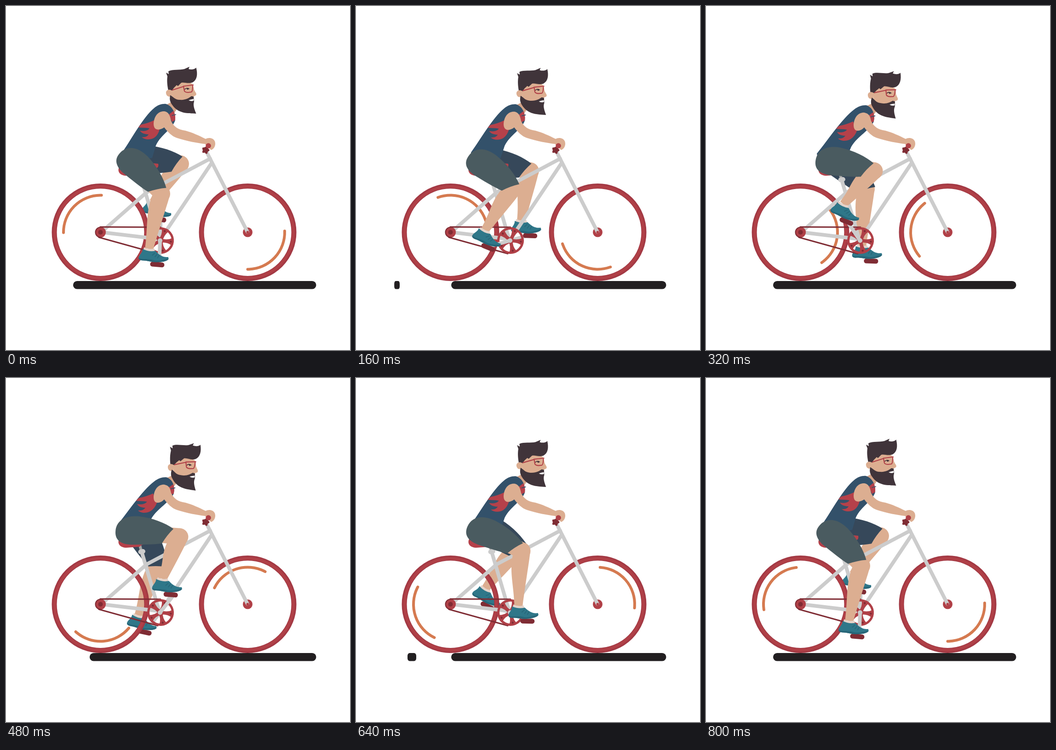
Write an HTML page with a canvas that moves like this. It is 748 px wide and 748 px high and loops after 0.84 s.

```html
<!DOCTYPE html>
<html lang="en">
<head>
<meta charset="utf-8">
<title>Cyclist</title>
<style>
html, body { margin: 0; width: 100%; height: 100%; overflow: hidden; background: #fff; }
canvas { display: block; }
</style>
</head>
<body>
<canvas id="stage" width="748" height="748"></canvas>
<script>
const ctx = document.getElementById('stage').getContext('2d');
const STEP = 40, STEPS = 21, CYCLE = 20, RAD = Math.PI / 180, TURN = 2 * Math.PI;
const C = {
  red: '#b04047', rim: '#a33944', dark: '#7f2c34', grey: '#cccccc', skin: '#dcae91', neck: '#d3a286',
  shirt: '#33516a', flame: '#b5414a', shorts: '#4a5b60', farShorts: '#36485a',
  shoe: '#2f7789', sole: '#276678', sock: '#e4d3ca', hair: '#40343a', orange: '#d57a50', black: '#221f21'
};
const BB = { x: 335, y: 510 };
const REAR = { x: 205.5, y: 492 }, FRONT = { x: 525.5, y: 492 };
const BREAKS = [-5, 3, 9, 15]; // steps at which the ground bar snaps

// Pedal ellipse, middle of the knee's path and its swing, for each leg
const NEAR = { color: C.shorts, pedal: { x: 331, y: 511, rx: 45, ry: 51 }, knee: { x: 357, y: 377 }, swing: 21, drift: 2 };
const FAR = { color: C.farShorts, pedal: { x: 332, y: 513, rx: 49, ry: 50 }, knee: { x: 357, y: 376 }, swing: 27, drift: 6 };

function fill(color, d) {
  ctx.fillStyle = color;
  ctx.fill(new Path2D(d));
}
function stroke(color, width, d, cap = 'round') {
  ctx.strokeStyle = color;
  ctx.lineWidth = width;
  ctx.lineCap = cap;
  ctx.lineJoin = 'round';
  ctx.stroke(new Path2D(d));
}
function line(color, width, x1, y1, x2, y2) {
  stroke(color, width, `M${x1} ${y1}L${x2} ${y2}`);
}
function disc(color, x, y, r) {
  ctx.fillStyle = color;
  ctx.beginPath();
  ctx.arc(x, y, r, 0, TURN);
  ctx.fill();
}
function arc(color, width, x, y, r, from = 0, to = 360) {
  ctx.strokeStyle = color;
  ctx.lineWidth = width;
  ctx.lineCap = 'round';
  ctx.beginPath();
  ctx.arc(x, y, r, from * RAD, to * RAD);
  ctx.stroke();
}
function pill(color, x, y, w, h, r) {
  ctx.fillStyle = color;
  ctx.beginPath();
  ctx.roundRect(x, y, w, h, r);
  ctx.fill();
}
function placed(x, y, angle, draw) {
  ctx.save();
  ctx.translate(x, y);
  ctx.rotate(angle);
  draw();
  ctx.restore();
}

const crankAngle = step => (92 + 18 * step) * RAD;

// How far the upper body leans: 0 upright, 1 down
function leanAt(step) {
  const u = 1 - Math.abs(step - 10) / 10;
  const a = u ** 2.6, b = (1 - u) ** 2.6;
  return a / (a + b);
}

// The foot follows the pedal and tips toe-down on the way up; the knee swings on a slim ellipse
function poseAt({ pedal, knee, swing, drift }, step) {
  const crank = crankAngle(step);
  const tip = (step - 6) / CYCLE * TURN, lift = (step - 11.3) / CYCLE * TURN;
  const foot = (11 + 12.5 * Math.cos(tip) + 3 * Math.cos(2 * tip)) * RAD;
  const cos = Math.cos(foot), sin = Math.sin(foot);
  return {
    foot,
    ankle: {
      x: pedal.x + pedal.rx * Math.cos(crank) - 21 * cos + 32 * sin,
      y: pedal.y + pedal.ry * Math.sin(crank) - 21 * sin - 32 * cos
    },
    knee: {
      x: knee.x + swing * Math.cos(lift) + drift * Math.sin(lift),
      y: knee.y - 33 * Math.cos(lift) + drift * Math.sin(lift)
    }
  };
}

function ground(step) {
  const snap = BREAKS.findLast(b => b <= step), age = step - snap;
  const left = 213 - 6 * age ** 1.5;
  pill(C.black, left, 598, 674.5 - left, 17.5, 8.7);
  const width = 10 + 0.6 * snap - 7 * (age - 1);
  if (width > 3) pill(C.black, 76 + 2.4 * snap - 20 * (age - 1), 598, width, 17.5, { x: width / 4, y: 6 });
}

function wheel({ x, y }, start) {
  arc(C.rim, 11, x, y, 100.5);
  arc(C.red, 6, x, y, 99.5);
  arc(C.orange, 6, x, y, 80.5, start, start + 92);
}

function leg(build, step, hip) {
  const { knee, ankle, foot } = poseAt(build, step);
  const thigh = Math.atan2(knee.y - hip.y, knee.x - hip.x), reach = Math.hypot(knee.x - hip.x, knee.y - hip.y);
  const shin = Math.atan2(ankle.y - knee.y, ankle.x - knee.x), len = Math.hypot(ankle.x - knee.x, ankle.y - knee.y);

  placed(ankle.x, ankle.y, foot, () => pill(C.dark, 5, 27, 31, 10.5, 5));
  disc(C.skin, knee.x, knee.y, 18.5);
  placed(knee.x, knee.y, shin, () => fill(C.skin,
    `M0 -18C25 -17 60 -13 ${len} -9L${len} 9C${len - 40} 12 50 24 15 20L0 18Z`));
  placed(ankle.x, ankle.y, foot, () => {
    fill(C.sock, 'M-11 -3Q0 2 11 -2L14 6L-13 6Z');
    fill(C.shoe, 'M-14 1C-13 10 -22 15 -21 22Q-20 26 -13 26C-2 25 5 28 18 27C33 26 43 22 44 18L43 14C33 16 25 13 14 3Q0 7 -14 1Z');
    fill(C.sole, 'M-21 21C-12 25 0 20 10 23C22 26 34 20 44 17C44 22 33 26 18 27.5C5 28 -2 25 -13 26Q-21 26 -21 21Z');
    stroke(C.sole, 1.6, 'M8 13L13 8M14 16L18 10M20 18L23 12');
  });
  placed(hip.x, hip.y, thigh, () => {
    fill(C.skin, `M70 -18L${reach} -18.5L${reach} 17L70 17Z`);
    fill(build.color, 'M-26 0C-26 -22 -8 -36 22 -36C52 -35 80 -27 99 -16'
      + 'Q86 -1 77 18C60 22 30 25 10 27C-15 28 -26 18 -26 0Z');
  });
}

function crank(angle) {
  line(C.grey, 8, BB.x, BB.y, BB.x + 49 * Math.cos(angle), BB.y + 49 * Math.sin(angle));
}

function saddle() {
  line('#a5a5a5', 6, 291, 364, 296, 382);
  fill(C.flame, 'M246 350C241 361 249 369 262 369L290 367C303 357 317 354 327 353Q333 350 331 343L300 340L255 340Z');
}

function frame() {
  line(C.grey, 8, 295, 378, 334, 510);
  line(C.grey, 10, 292.5, 378, 298, 377);
  line(C.grey, 8, 208, 492, 334, 507);
  stroke(C.grey, 8, 'M208 491L306 405L444 332');
  line(C.grey, 8, 334, 510, 446, 343);
  disc(C.red, FRONT.x, FRONT.y, 10.5);
  line(C.grey, 8, 437, 319, 525, 491);
  disc(C.red, FRONT.x, FRONT.y, 3);
}

function drivetrain(angle) {
  disc(C.red, REAR.x, REAR.y, 11.5);
  disc(C.dark, REAR.x, REAR.y, 5);
  stroke(C.dark, 3, 'M205 480.5L336 481M202 503L330 538.5');
  arc(C.dark, 2, REAR.x, REAR.y, 11, 90, 270);
  placed(336, 510, angle - 86 * RAD, () => {
    arc(C.red, 5, 0, 0, 26.5);
    for (let i = 0; i < 5; i++) {
      ctx.rotate(TURN / 5);
      fill(C.red, 'M0 -5Q13 -1 25 -8L25 8Q13 1 0 5Z');
      disc(C.dark, 22.5, 0, 2.2);
    }
    disc(C.red, 0, 0, 7);
  });
  disc(C.grey, 335, 510, 5);
}

function torso(lean) {
  ctx.save();
  ctx.transform(1, 0, -0.13 * lean, 1, 29 * lean, 3 * lean);
  fill(C.shirt, 'M253 318C275 286 298 242 322 222C330 215 340 212 348 213C362 218 369 232 368 248C362 268 338 278 326 303L318 330L262 345Z');
  fill(C.flame, 'M293 258Q309 255 323 248L334 268Q331 280 323 286C316 291 302 292 295 285C303 286 308 283 310 279C302 279 295 277 291 271C300 273 309 271 312 266C304 264 296 265 288 264Z');
  fill(C.flame, 'M354 236L364 228Q369 236 368 248L361 252Z');
  stroke(C.shirt, 1.8, 'M361 238L369 236');
  ctx.restore();
}

function arm(lean) {
  const s = 3 * lean;
  fill(C.skin, `M321 ${256 + s}C322 ${238 + s} 332 ${228 + s} 345 ${229 + s}C354 ${231 + s} 357 239 359 250`
    + 'C365 263 375 269 390 271C405 275 420 282 434 289C441 285 451 287 454 294C457 302 453 311 446 313L438 306L433 300'
    + `C415 298 395 294 372 287C360 283 352 274 344 264C336 ${270 + s} 321 ${273 + s} 321 ${256 + s}Z`);
}

function grip() {
  disc(C.dark, 434, 313, 6.5);
  for (let a = 0; a < TURN; a += TURN / 5) disc(C.dark, 434 + 6 * Math.cos(a), 313.5 + 6 * Math.sin(a), 2.4);
  disc(C.red, 440, 304, 5.8);
}

function head(lean) {
  ctx.save();
  ctx.translate(413 - lean, 234 + 11 * lean);
  ctx.rotate(6.1 * RAD * lean);
  ctx.translate(-413, -234);
  fill(C.skin, 'M359 172C375 162 395 162 406 170L409 182C411 187 415 190 413.5 193C412 196 409 195 408 197L408 207L362 207Z');
  fill(C.hair, 'M353 184C350 170 350 160 351 153L348 145L354 148L353 142C362 137 378 140 388 137L399 132L397 137C403 139 410 138 413.5 134C417 148 416 160 406 166C396 170 388 165 381 167L374 174L371 172L365 178L361 184Z');
  fill(C.skin, 'M361 184C352 179 347 185 348 190C349 197 356 199 361 195Z');
  fill(C.hair, 'M357 194C363 196 366 204 378 204C390 205 398 200 403 196L408 197L409 208C406 216 410 225 413.5 234C395 233 374 235 360 213C355 205 356 200 357 194Z');
  fill('#fff', 'M397 205Q403 203 408 202L408 206Q402 208 397 205Z');
  stroke(C.red, 2.2, 'M361 183L386 175M385 174.5L408 171.5M386 175L388 185Q390 188 396 188L403 187Q406 186 406 173', 'butt');
  stroke(C.hair, 1.6, 'M389 181Q392 177 398 180');
  disc(C.hair, 395, 180, 2);
  ctx.restore();
}

function render(step) {
  const lean = leanAt(step), sway = Math.sin(step / CYCLE * TURN);
  const angle = crankAngle(step);
  const u = step / CYCLE, slip = u ** 4 * (1 - u); // the wheels drift apart, then realign
  ctx.clearRect(0, 0, 748, 748);
  ground(step);

  crank(angle + Math.PI);
  leg(FAR, step + CYCLE / 2, { x: 284 - 3 * sway, y: 338 + 6 * sway });
  wheel(REAR, 179.5 + 17.6 * step + 180 * slip);
  wheel(FRONT, -2 + 18 * step - 150 * slip);
  saddle();
  frame();
  drivetrain(angle);
  crank(angle);

  fill(C.neck, `M350 ${214 + 3 * lean}L372 ${202 + 5 * lean}L373 ${222 + 4 * lean}L365 ${234 + 2 * lean}Z`);
  torso(lean);
  leg(NEAR, step, { x: 267 - 3 * lean, y: 337 + 4 * sway });
  arm(lean);
  grip();
  head(lean);
}

function tick(now) {
  render(Math.floor(now / STEP) % STEPS);
  requestAnimationFrame(tick);
}
render(0);
requestAnimationFrame(tick);
</script>
</body>
</html>
```
